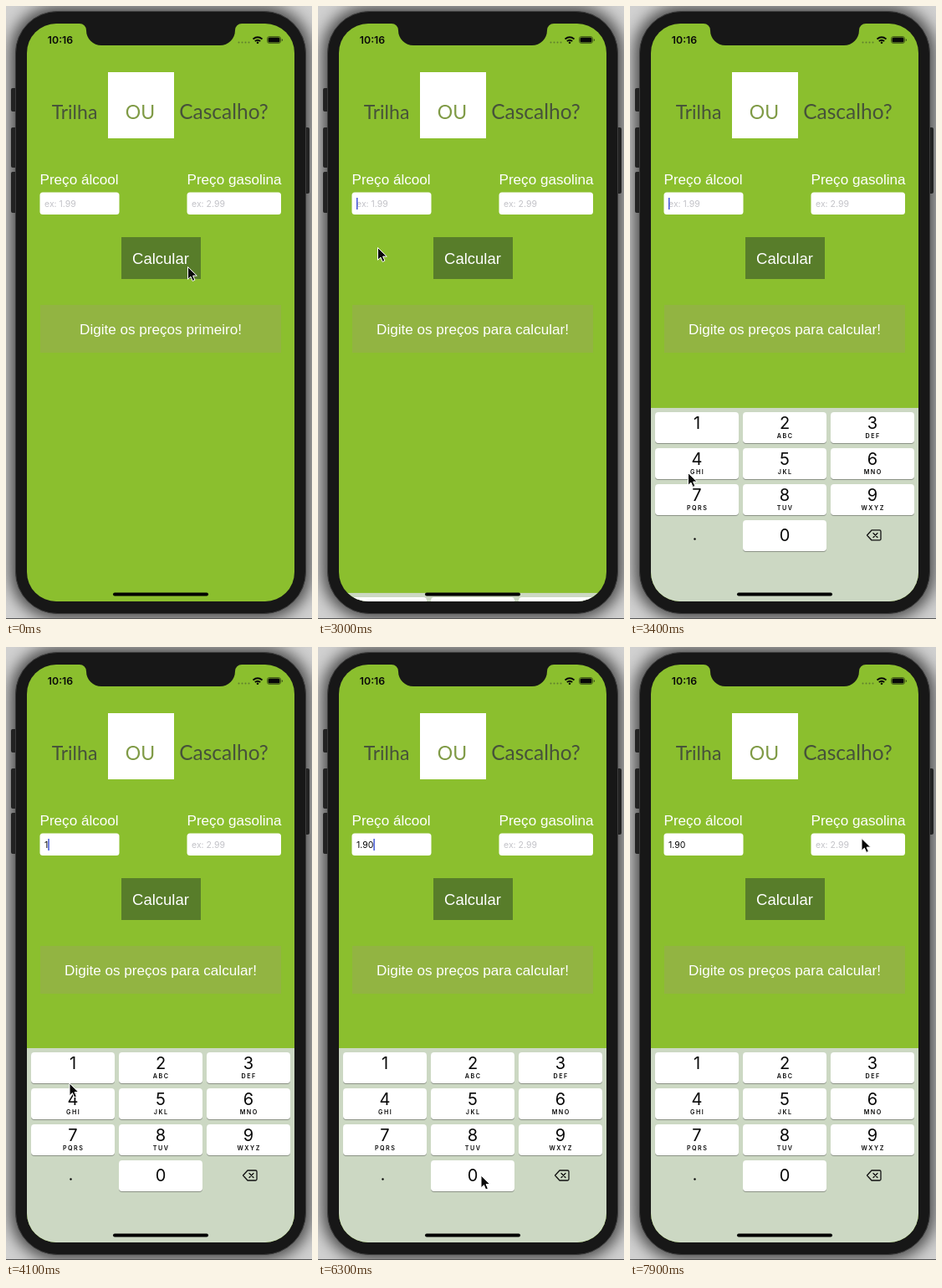
An HTML page that plays this animation: 366 px wide and 732 px high, repeating every 8000 ms.

```html
<!DOCTYPE html>
<html lang="pt">
<head>
<meta charset="utf-8">
<title>Calculadora de preços</title>
<style>
  html, body { margin: 0; width: 100%; height: 100%; overflow: hidden; background: #d0d0d0; }
  svg { display: block; width: 366px; height: 732px; }
  text { font-family: "Liberation Sans", Arial, sans-serif; fill: #fff; }
  .ui { font-family: Inter, Roboto, sans-serif; fill: #080808; }
  .hint { fill: #c3c3c8; }
  .title { font-family: Lato, "Open Sans", sans-serif; fill: #46523a; }
  .mid { text-anchor: middle; }
</style>
</head>
<body>
<svg viewBox="0 0 366 732" xmlns="http://www.w3.org/2000/svg">
  <defs>
    <clipPath id="screen"><rect x="25" y="21" width="320" height="690" rx="35"/></clipPath>
    <filter id="blur" x="-20%" y="-20%" width="140%" height="140%"><feGaussianBlur stdDeviation="9"/></filter>
  </defs>

  <rect width="366" height="732" fill="#d0d0d0"/>
  <rect x="5" y="0" width="360" height="732" rx="56" fill="#000" opacity=".65" filter="url(#blur)"/>
  <rect y="731" width="366" height="1" fill="#555"/>

  <g fill="#222">
    <rect x="6" y="98" width="8" height="28" rx="2"/>
    <rect x="6" y="145" width="8" height="48" rx="2"/>
    <rect x="6" y="198" width="8" height="49" rx="2"/>
    <rect x="354" y="145" width="9" height="79" rx="2"/>
  </g>
  <rect x="11.5" y="6.5" width="347" height="719" rx="50" fill="#171717" stroke="#3c3c3c"/>

  <g clip-path="url(#screen)">
    <rect x="25" y="21" width="320" height="690" fill="#8bbf2e"/>

    <rect x="122" y="79" width="79" height="79" fill="#fff"/>
    <g class="mid">
      <text class="title" x="82" y="135" font-size="23">Trilha</text>
      <text class="title" x="160.5" y="135" font-size="23" style="fill:#7f9a45">OU</text>
      <text class="title" x="260.5" y="135" font-size="24.5">Cascalho?</text>
    </g>

    <text x="40.5" y="213" font-size="17.1">Preço álcool</text>
    <text x="216.5" y="213" font-size="17.1">Preço gasolina</text>
    <rect x="40.5" y="222.5" width="95" height="26.500" rx="3.500" fill="#fff"/>
    <rect x="216.5" y="222.5" width="112.500" height="26.500" rx="3.500" fill="#fff"/>
    <text id="value" class="ui" x="46" y="240" font-size="10.5"></text>
    <text class="ui hint" x="222" y="240" font-size="10.5">ex: 2.99</text>
    <rect id="caret" y="229" width="1.5" height="14" fill="#4257d6"/>

    <rect x="138" y="276" width="95" height="50" fill="#587d2a"/>
    <text class="mid" x="185" y="308" font-size="18.5">Calcular</text>
    <rect x="41" y="357" width="288" height="57" fill="#92b442"/>
    <text id="message" class="mid" x="185" y="392" font-size="17.1"></text>

    <g id="keyboard">
      <rect x="25" y="479" width="320" height="240" fill="#ccd8c3"/>
      <g id="keys"></g>
      <circle cx="77.5" cy="635.5" r="1.2" fill="#080808"/>
      <g fill="none" stroke="#111" stroke-width="1.3" stroke-linejoin="round" stroke-linecap="round">
        <path d="M283.5 631l5.5-6h9.5q1.5 0 1.5 1.5v9q0 1.5-1.5 1.5h-9.5z"/>
        <path d="M291 628.5l5 5m0-5l-5 5"/>
      </g>
    </g>
    <rect x="128" y="700.5" width="114" height="4" rx="2" fill="#000"/>
  </g>

  <path d="M88 19v2a8 8 0 0 1 8 8 18 18 0 0 0 18 18h142a18 18 0 0 0 18-18 8 8 0 0 1 8-8v-2z" fill="#171717"/>

  <text class="ui mid" x="65" y="45" font-size="12.3" font-weight="600">10:16</text>
  <g fill="#5f7d2e">
    <circle cx="278.5" cy="43.5" r="1"/><circle cx="282.5" cy="43.5" r="1"/>
    <circle cx="286.5" cy="43.5" r="1"/><circle cx="290.5" cy="43.5" r="1"/>
  </g>
  <g fill="none" stroke="#080808" stroke-width="1.8">
    <path d="M295.5 39.5q5.5-4.5 11 0"/>
    <path d="M297.8 42q3.2-2.6 6.4 0"/>
  </g>
  <circle cx="301" cy="43.8" r="1.3" fill="#080808"/>
  <rect x="312.5" y="36.5" width="16" height="8" rx="2.5" fill="none" stroke="#080808" stroke-opacity=".5"/>
  <rect x="313.5" y="37.5" width="14" height="6" rx="1.5" fill="#080808"/>
  <path d="M329.8 39v3.2q1.3-.5 1.3-1.6t-1.3-1.6z" fill="#080808" opacity=".6"/>

  <path id="cursor" d="M0 0v14.8l3.4-3.2 2.3 5.3 2.7-1.2-2.3-5.1h4.7z"
        fill="#080808" stroke="#fff" stroke-width="1"/>
</svg>

<script>
const LOOP = 8000, STEP = 100;
const $ = id => document.getElementById(id);

// time, x, y of the pointer's tip
const path = [
  [0, 217.5, 311.5], [300, 217.5, 311.5], [1200, 204, 97], [2100, 204, 97],
  [2600, 70, 236], [2900, 70, 242], [3000, 71.5, 288.5], [3400, 69.5, 557.5],
  [3700, 76, 500], [4000, 76, 500], [4400, 76, 634], [4700, 76, 634],
  [5300, 311, 579], [5500, 311, 579], [5900, 190, 631], [6300, 195, 631],
  [6700, 195, 631], [7600, 277, 232], [7900, 277, 228.5]
];
// time and content of the field after each tap
const typing = [[2800, ""], [3900, "1"], [4600, "1."], [5500, "1.9"], [6100, "1.90"]];
const FOCUS = typing[0][0], KEYBOARD_START = 2982;

function buildKeys() {
  const letters = ["", "ABC", "DEF", "GHI", "JKL", "MNO", "PQRS", "TUV", "WXYZ"];
  const key = (digit, sub, col, row) => {
    const x = 30 + col * 105, y = 484 + row * 43, mid = x + 50;
    return `<rect x="${x}" y="${y + 1}" width="100" height="37" rx="4" fill="#8b9285"/>
      <rect x="${x}" y="${y}" width="100" height="37" rx="4" fill="#fff"/>
      <text class="ui mid" x="${mid}" y="${y + (digit ? 20 : 25)}" font-size="20">${digit}</text>
      <text class="ui mid" x="${mid + 0.7}" y="${y + 31}" font-size="7.2" font-weight="600"
        letter-spacing="1.5">${sub}</text>`;
  };
  $("keys").innerHTML =
    letters.map((sub, i) => key(i + 1, sub, i % 3, Math.floor(i / 3))).join("") + key(0, "", 1, 3);
}

function pointerAt(t) {
  const i = path.findIndex(p => p[0] > t);
  if (i < 0) return path[path.length - 1].slice(1);
  const [t0, x0, y0] = path[i - 1], [t1, x1, y1] = path[i];
  const u = (t - t0) / (t1 - t0), e = u * u * (3 - 2 * u);
  return [x0 + (x1 - x0) * e, y0 + (y1 - y0) * e];
}

// Critically damped spring from 232 px below to rest
function keyboardOffset(t) {
  const a = Math.max(0, t - KEYBOARD_START) * 0.01826;
  return 232 * (1 + a) * Math.exp(-a);
}

function drawField(t) {
  const [since, content] = typing.filter(k => k[0] <= t).pop() || [0, ""];
  const value = $("value"), caret = $("caret");
  value.textContent = content || "ex: 1.99";
  value.classList.toggle("hint", !content);
  const phase = (t - since) % 1000;
  const fade = Math.min(1, Math.max(0, (800 - phase) / 200));
  caret.setAttribute("x", 46 + (content ? value.getComputedTextLength() : 0));
  caret.setAttribute("opacity", t < FOCUS ? 0 : fade);
}

function draw(t) {
  const [x, y] = pointerAt(t);
  $("cursor").setAttribute("transform", `translate(${x} ${y})`);
  $("cursor").setAttribute("opacity", t >= 1700 && t < 2100 ? 0 : 1);
  $("message").textContent = "Digite os preços " + (t < 600 ? "primeiro!" : "para calcular!");
  $("keyboard").setAttribute("transform", `translate(0 ${keyboardOffset(t)})`);
  drawField(t);
}

const start = performance.now();
function tick() {
  const t = (performance.now() - start) % LOOP;
  draw(Math.floor(t / STEP) * STEP);
  requestAnimationFrame(tick);
}
buildKeys();
tick();
</script>
</body>
</html>
```
